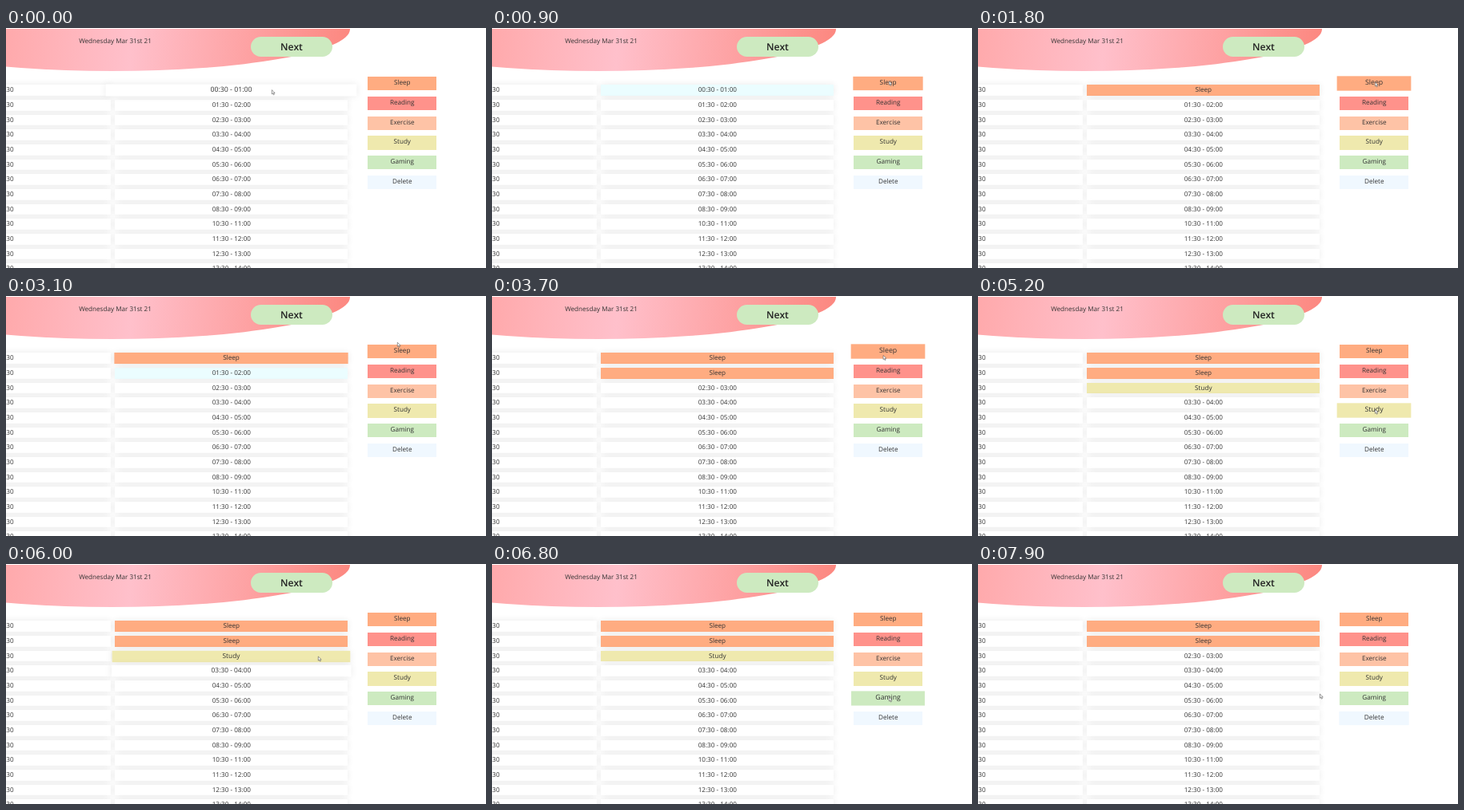
An HTML page for the animation above (8 s loop, 600 by 301 pixels).

```html
<!DOCTYPE html>
<html lang="en">
<head>
<meta charset="utf-8">
<title>Day planner</title>
<style>
  html, body { margin: 0; width: 100%; height: 100%; overflow: hidden; background: #fff; }
  #stage {
    position: relative; width: 600px; height: 301px; overflow: hidden;
    font: 8.15px "Open Sans", sans-serif; color: #333; text-align: center; white-space: nowrap;
    text-rendering: geometricPrecision;
  }
  #stage > * { position: absolute; }
  .header {
    left: -165px; top: 1px; width: 595px; height: 52.5px;
    border-radius: 0 0 50% 50% / 0 0 100% 100%;
    background: linear-gradient(95deg, #ff928b, #ffc0cb 54%, #fc877f);
  }
  .date { left: 36.5px; top: 10px; width: 200px; line-height: 14px; }
  .next {
    left: 306px; top: 11px; width: 102px; height: 25px; border-radius: 13px;
    background: #cdeac0; color: #222; font-size: 12.2px; font-weight: 600; line-height: 25px;
  }
  .row { background: #fff; box-shadow: 0 0 9px rgba(0, 0, 0, .085); }
  #cursor { left: 0; top: 0; width: 5px; height: 7px; z-index: 3; overflow: visible; }
</style>
</head>
<body>
<div id="stage">
  <div class="header"></div>
  <div class="date">Wednesday Mar 31st 21</div>
  <div class="next">Next</div>
  <svg id="cursor" viewBox="0 0 5 7">
    <path d="M.3 .3V5.4L1.5 4.4L2.4 6.4L3.3 6L2.5 4.1H4.2Z" fill="#fff" stroke="#555" stroke-width=".6"/>
  </svg>
</div>
<script>
const LOOP = 8000, FADE = 280, SAMPLES = 14, GROWTH = 0.078;
const stage = document.getElementById('stage');
const cursor = document.getElementById('cursor');

function addBox(className, label, x, y, width, height, color = '') {
  const el = document.createElement('div');
  el.className = className;
  el.textContent = label;
  Object.assign(el.style, {
    left: x + 'px', top: y + 'px', width: width + 'px', height: height + 'px',
    lineHeight: height - 0.4 + 'px', background: color
  });
  stage.append(el);
  return { el, label, x, y, width, height, color };
}

const pad = n => String(n).padStart(2, '0');
const rows = Array.from({ length: 13 }, (_, i) => {
  const hour = i < 9 ? i : i + 1;
  const y = 71.4 + i * 18.67;
  addBox('row', `${pad(hour)}:00 - ${pad(hour)}:30`, -160, y, 291, 13.6);
  return addBox('row', `${pad(hour)}:30 - ${pad(hour + 1)}:00`, 136.3, y, 291, 13.6);
});

const colors = {
  Sleep: '#ffac81', Reading: '#ff928b', Exercise: '#fec3a6',
  Study: '#efe9ae', Gaming: '#cdeac0', Delete: '#f0f8ff'
};
const buttons = {};
Object.entries(colors).forEach(([name, color], i) => {
  buttons[name] = addBox('button', name, 452.2, 61 + i * 24.78, 86.2, 17.2, color);
});
const boxes = [...rows, ...Object.values(buttons)];

// A stay on a box, with a click shortly before leaving
const visitRow = (i, arrive, leave, x = 390) =>
  ({ box: rows[i], x, y: rows[i].y + 6, swing: 165, arrive, click: leave - 100, leave });

function visitButton(name, arrive, leave, clicks = true) {
  const box = buttons[name], y = box.y + 6.5;
  return { box, x: 496, y, swing: y - 30, arrive, click: clicks ? leave - 100 : Infinity, leave };
}

const visits = [
  visitRow(0, 0, 400, 332),
  visitButton('Sleep', 950, 1800),
  visitRow(1, 2500, 2700),
  visitButton('Sleep', 3300, 3600),
  visitRow(2, 4500, 4600),
  visitButton('Study', 4850, 5200),
  visitRow(2, 6050, 6150),
  visitButton('Gaming', 6700, 7050, false),
  visitButton('Delete', 7250, 7550),
  visitRow(1, 8350, 8500)
];

const smooth = v => v * v * (3 - 2 * v);

// Between visits the pointer follows a quadratic curve bent towards the swing height
function pointerAt(t) {
  const i = Math.max(1, visits.findIndex(visit => visit.arrive > t));
  const from = visits[i - 1], to = visits[i];
  const k = smooth(Math.max(0, (t - from.leave) / (to.arrive - from.leave)));
  const bend = (a, control, b) => (1 - k) ** 2 * a + 2 * k * (1 - k) * control + k * k * b;
  return { x: bend(from.x, to.x, to.x), y: bend(from.y, to.swing, to.y) };
}

const contains = (box, p) =>
  p.x > box.x && p.x < box.x + box.width && p.y > box.y && p.y < box.y + box.height;

// Growth follows the share of the last FADE ms spent over the box
function drawHover(t) {
  const trail = Array.from({ length: SAMPLES }, (_, i) => pointerAt(t - i * FADE / SAMPLES));
  for (const box of boxes) {
    const amount = smooth(trail.filter(p => contains(box, p)).length / SAMPLES);
    box.el.style.transform = amount ? `scale(${1 + GROWTH * amount})` : '';
    box.el.style.zIndex = amount ? 2 : '';
  }
  cursor.style.transform = `translate(${trail[0].x}px, ${trail[0].y}px)`;
}

// Replays the clicks so far: first a row is selected, then a button fills or clears it
function drawRows(t) {
  const filled = new Map();
  let selected = null;
  for (const { box, click } of visits) {
    if (click > t) continue;
    if (rows.includes(box)) {
      selected = box;
    } else {
      if (box === buttons.Delete) filled.delete(selected);
      else filled.set(selected, box);
      selected = null;
    }
  }
  for (const row of rows) {
    const entry = filled.get(row);
    const text = (entry || row).label;
    if (row.el.textContent !== text) row.el.textContent = text;
    row.el.style.background = entry ? entry.color : row === selected ? '#ebfdff' : '';
  }
}

const began = performance.now();
function tick() {
  const t = (performance.now() - began) % LOOP;
  drawHover(t);
  drawRows(t);
  requestAnimationFrame(tick);
}
tick();
</script>
</body>
</html>
```
